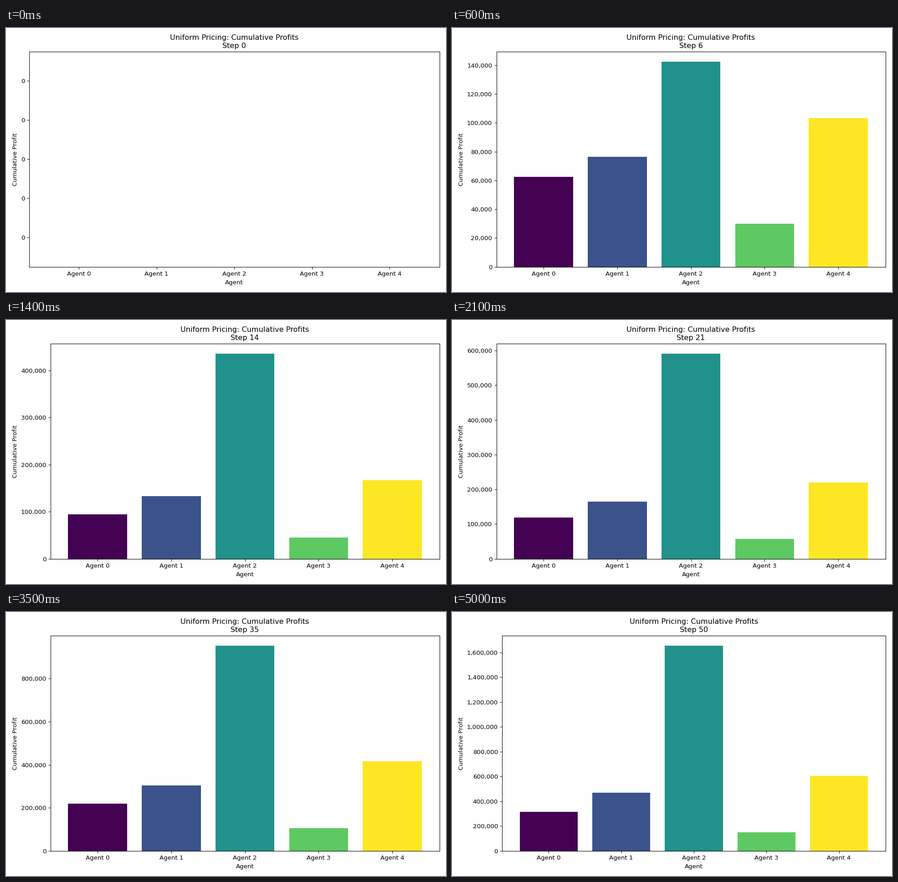
Recreate the animation shown at these times as a matplotlib script. Size 966 by 580 pixels, loop 5100 ms.

```python
import numpy as np
import matplotlib.pyplot as plt
from matplotlib.animation import FuncAnimation
from matplotlib.ticker import FuncFormatter

WIDTH, HEIGHT, DPI = 966, 580, 96.6
STEPS = 51
INTERVAL = 100  # ms per step

plt.rcParams["font.family"] = "DejaVu Sans"

# Step, then profits of agents 0, 1 and 2 in thousands; linear in between.
KEYS = np.array([
    (0, 0, 0, 0),
    (6, 62.6, 76.5, 142.3),
    (14, 94, 132.9, 435.2),
    (27, 140.8, 191.2, 722.9),
    (35, 218.6, 303.5, 952),
    (41, 265.3, 389.3, 1237.8),
    (50, 314.6, 468.8, 1653.4),
]).T

AGENTS = [f"Agent {i}" for i in range(5)]
COLORS = plt.cm.viridis(np.linspace(0, 1, len(AGENTS)))
THOUSANDS = FuncFormatter(lambda value, pos: f"{int(value):,}")


def profits_at(step):
    first, second, third = (1000 * np.interp(step, KEYS[0], row)
                            for row in KEYS[1:])
    # Agents 3 and 4 follow agent 0, the last with a share that levels off.
    share = 1.94 - 0.445 * np.exp(-step / 14)
    return [first, second, third, 0.479 * first, share * first]


# The small surplus keeps the pixel size from being rounded down.
fig, ax = plt.subplots(figsize=((WIDTH + 0.01) / DPI, (HEIGHT + 0.01) / DPI),
                       dpi=DPI)


def draw(step):
    ax.clear()
    bars = ax.bar(AGENTS, profits_at(step), color=COLORS)
    ax.set_title(f"Uniform Pricing: Cumulative Profits\nStep {step}")
    ax.set_xlabel("Agent")
    ax.set_ylabel("Cumulative Profit")
    ax.yaxis.set_major_formatter(THOUSANDS)
    fig.tight_layout()
    return list(bars)


draw(0)
anim = FuncAnimation(fig, draw, frames=STEPS, init_func=lambda: draw(0),
                     interval=INTERVAL, repeat=True, repeat_delay=0)
plt.show()
```
